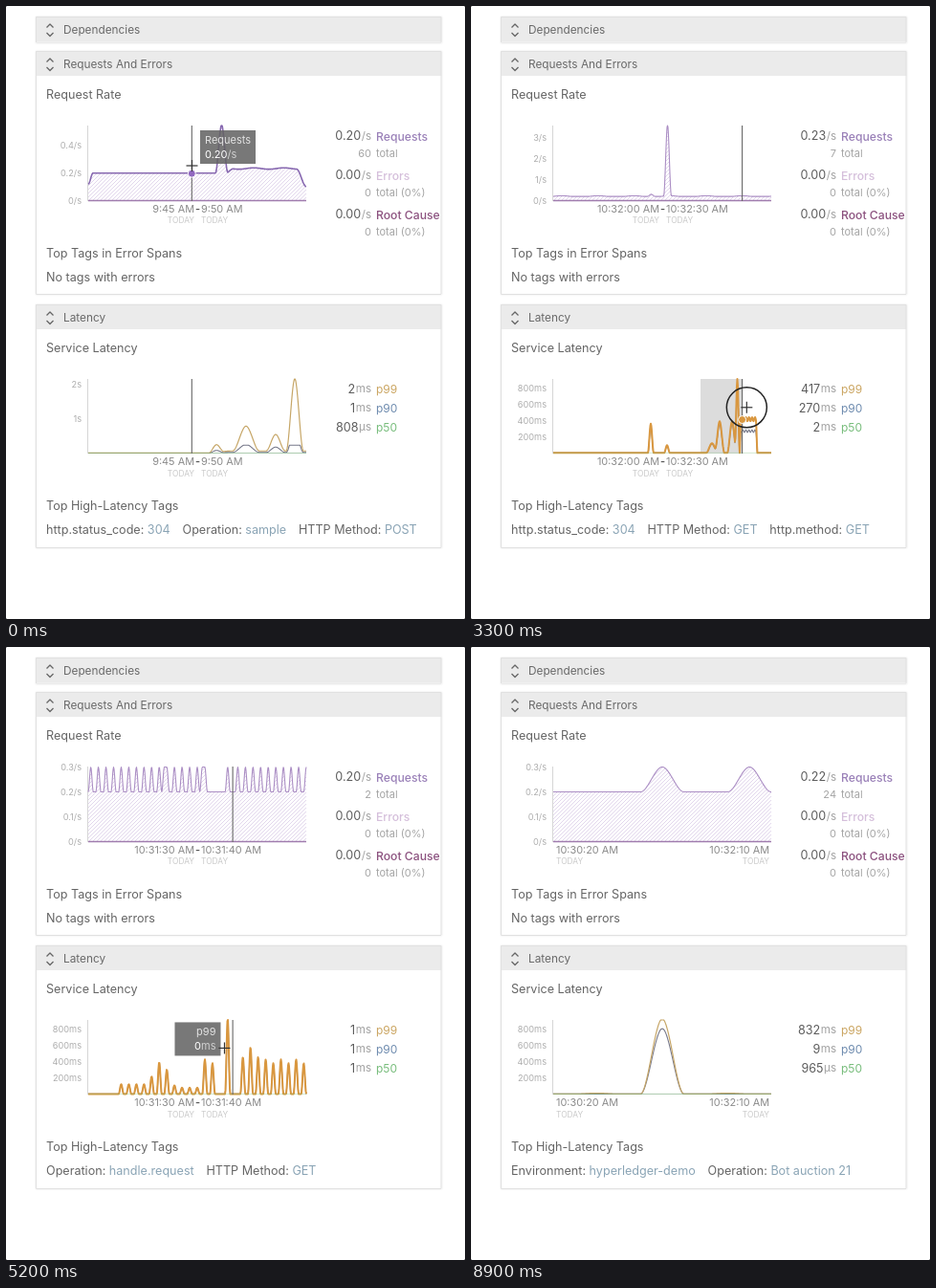
An HTML page with a canvas that plays this animation: 480x641 px, repeating every 9100 ms.

```html
<!DOCTYPE html>
<html lang="en">
<head>
<meta charset="utf-8">
<title>Service dashboard</title>
<style>
html, body { margin: 0; width: 100%; height: 100%; overflow: hidden; background: #fff; }
canvas { display: block; width: 480px; height: 641px; }
</style>
</head>
<body>
<canvas id="stage"></canvas>
<script>
const LOOP = 9100, LEFT = 86, RIGHT = 314;
const RATE = { top: 125, base: 204 }, LATENCY = { top: 390, base: 468 };
const COLORS = { p99: '#cba663', p90: '#6f8caf', p50: '#78bd7c', tag: '#8aa4b5' };
const canvas = document.getElementById('stage'), ctx = canvas.getContext('2d');
const dpr = window.devicePixelRatio || 1;
canvas.width = 480 * dpr;
canvas.height = 641 * dpr;

const ramp = (x, from, to) => {
  const u = Math.min(1, Math.max(0, (x - from) / (to - from)));
  return u * u * (3 - 2 * u);
};
const bump = (x, center, half, height) => height * ramp(Math.abs(x - center), half, 0);
const bumps = (x, ...list) => list.reduce((sum, [c, half, h]) => sum + bump(x, c, half, h), 0);
// Smooth curve through one value per time bin.
const binned = (bins, value) => x => {
  const position = (x - LEFT) / (RIGHT - LEFT) * bins, n = Math.floor(position + 1e-6);
  return value(n) + (value(n + 1) - value(n)) * ramp(position, n, n + 1);
};
const clock = (h, m, s) => h * 3600 + m * 60 + s;

// A burst of requests every third bin, with a pause around the slow request.
const isBurst = n => n < 47 ? n % 3 === 1 || (n > 15 && n % 15 === 0) : n === 55 || (n > 57 && n % 3 === 2);
function burstLatency(n) {
  const i = (n - 13) / 3;
  if (i < 0 || i % 1 || i === 13 || i === 15) return 0;
  if (i === 14) return 930;
  if (i < 11) return (i < 4 ? 120 : 78) + bump(i, 5.2, 2.2, 320);
  return (i % 2 ? 425 : 379) + bump(i, 17, 2, 150);
}
const slowBurst = binned(86, burstLatency);
const quiet = x => x > 270 ? .81 : 1;
const hourlyP99 = x => 2 + 60 * ramp(x, 214, 235)
  + bumps(x, [220, 8, 230], [251, 14, 720], [282, 10, 480], [302, 9, 2100]);
const plateauP99 = x => 2 + bumps(x, [188, 3, 360], [205, 3, 95], [252, 6, 120], [260, 5, 390], [273, 5, 390], [278.5, 2.5, 920])
  + (415 + 25 * Math.sin((x - 283.6) * 2)) * ramp(x, 281, 282) * ramp(x, 299.5, 298);

const scenes = [
  {
    bins: 40, bin: 300, shortTime: true, rateScale: 144, rateStep: .2, latencyScale: .036, latencyStep: 1000,
    time: x => clock(9, 45, 0) + (x - 194) * 53,
    rate: x => .2 - .08 * ramp(x, 91, 86) - .13 * ramp(x, 304, 314) + bump(x, 225.5, 6.5, .35)
      + (.033 + .005 * Math.sin(x / 5)) * ramp(x, 230, 238),
    p99: hourlyP99,
    p90: x => Math.max(1, Math.min(230, hourlyP99(x) * .32)),
    p50: () => .808,
    tags: [['http.status_code', '304'], ['Operation', 'sample'], ['HTTP Method', 'POST']]
  },
  {
    bins: 105, bin: 30, rateScale: 22, rateStep: 1, latencyScale: .085, latencyStep: 200,
    time: x => clock(10, 32, 0) + (x - 283) * 13.9,
    rate: x => .2 + bumps(x, [188.5, 4, .1], [205.5, 4, 3.4]) + .03 * Math.max(0, Math.cos((x - 283.6) / 6)),
    p99: plateauP99,
    p90: x => plateauP99(x) * (x > 281 ? .647 : .92),
    p50: () => 2,
    tags: [['http.status_code', '304'], ['HTTP Method', 'GET'], ['http.method', 'GET']]
  },
  {
    bins: 86, bin: 10, rateScale: 260, rateStep: .1, latencyScale: .085, latencyStep: 200,
    time: x => clock(10, 32, 0) + (x - 245) * 3.75,
    rate: binned(86, n => isBurst(n) ? .3 : .2),
    p99: x => quiet(x) + .003 + slowBurst(x),
    p90: x => quiet(x) + .002 + slowBurst(x) * .97,
    p50: quiet,
    tags: [['Operation', 'handle.request'], ['HTTP Method', 'GET']]
  },
  {
    bins: 10, bin: 10, rateScale: 260, rateStep: .1, latencyScale: .085, latencyStep: 200,
    time: x => clock(10, 30, 20) + (x - LEFT) / 2.28,
    rate: binned(10, n => n === 5 || n === 9 ? .3 : .2),
    p99: binned(10, n => n === 5 ? 925 : n % 6 === 2 ? 12 : 1),
    p90: binned(10, n => n === 5 ? 805 : 1),
    p50: () => 1,
    tags: [['Environment', 'hyperledger-demo'], ['Operation', 'Bot auction 21']]
  }
];

const loads = [[850, 1700], [3550, 4200], [6050, 6700]];
const drags = [[150, 850], [2580, 3550], [5450, 6050]];
// Each move: start, end, target x, target y.
const moves = [[150, 800, 255, 166], [1700, 2400, 240, 419], [2580, 3520, 303, 420], [4200, 4600, 286, 422],
  [4600, 5300, 219, 419], [5450, 5920, 246, 419], [8000, 8500, 320, 490], [8500, 8800, 435, 670]];

function pointer(t) {
  return moves.reduce(([x, y], [start, end, toX, toY]) => {
    const u = Math.min(1, Math.max(0, (t - start) / (end - start)));
    return [x + (toX - x) * u, y + (toY - y) * u];
  }, [194.5, 167]);
}
const during = (ranges, t) => ranges.find(([a, b]) => t >= a && t < b);

function snap(x, bins) {
  const step = (RIGHT - LEFT) / bins;
  return LEFT + Math.round((x - LEFT) / step) * step;
}

function text(s, x, cy, size, color, align = 'left', weight = 400) {
  ctx.font = `${weight} ${size}px Inter, sans-serif`;
  ctx.fillStyle = color;
  ctx.textAlign = align;
  ctx.fillText(s, x, cy + size * .36);
  return ctx.measureText(s).width;
}

function stroke(points, color, width = 1) {
  ctx.beginPath();
  points.forEach(([x, y]) => ctx.lineTo(x, y));
  ctx.strokeStyle = color;
  ctx.lineWidth = width;
  ctx.stroke();
}

function card(title, y, height) {
  ctx.save();
  ctx.shadowColor = 'rgba(0,0,0,.1)';
  ctx.shadowBlur = 2 * dpr;
  ctx.fillStyle = '#fff';
  ctx.fillRect(31, y, 424.5, height);
  ctx.restore();
  ctx.fillStyle = '#ebebeb';
  ctx.fillRect(31, y, 424.5, Math.min(height, 26));
  ctx.strokeStyle = '#e1e1e1';
  ctx.lineWidth = 1;
  ctx.strokeRect(31.5, y + .5, 423.5, height - 1);
  const cy = y + 14;
  stroke([[42.5, cy - 2.5], [46, cy - 6], [49.5, cy - 2.5]], '#666', 1.3);
  stroke([[42.5, cy + 3], [46, cy + 6.5], [49.5, cy + 3]], '#666', 1.3);
  text(title, 60, cy, 11.8, '#696969');
}

const heading = (s, cy) => text(s, 42, cy, 12.6, '#656565');

function loading(x, cy, t) {
  const turn = t / 1000 * Math.PI * 2;
  ctx.lineWidth = 3;
  ctx.strokeStyle = '#e0e0e3';
  ctx.beginPath();
  ctx.arc(x, cy, 6, turn - 2.6, turn + 2.1);
  ctx.stroke();
  text('Loading...', x + 12, cy, 12.1, '#adadad');
}

function drawLoading(t) {
  card('Requests And Errors', 47, 149);
  card('Latency', 205, 149);
  [['Request Rate', 'Top Tags in Error Spans'], ['Service Latency', 'Top High-Latency Tags']].forEach(([a, b], i) => {
    const y = 92.5 + i * 158;
    heading(a, y);
    loading(213.5, y + 25, t);
    heading(b, y + 59);
    loading(49.5, y + 84, t);
  });
}

function trace(f, area, scale) {
  const points = [];
  for (let x = LEFT; x <= RIGHT; x += .5) points.push([x, Math.max(area.top, area.base - .5 - f(x) * scale)]);
  return points;
}

function axis(area, first, step, scale, label) {
  stroke([[85.5, area.top], [85.5, area.base]], '#d6d6d6');
  for (let n = first; n * step * scale < area.base - area.top; n++) {
    text(label(n * step), 79, area.base - n * step * scale - .5, 9.2, '#adadad', 'right');
  }
}

function hatch(points, base) {
  ctx.save();
  ctx.beginPath();
  points.forEach(([x, y]) => ctx.lineTo(x, y));
  ctx.lineTo(RIGHT, base);
  ctx.lineTo(LEFT, base);
  ctx.clip();
  for (let x = LEFT - 80; x < RIGHT; x += 4) stroke([[x, base], [x + 80, base - 80]], '#dfd3ea', .9);
  ctx.restore();
}

function timeText(seconds, short) {
  const pad = n => String(n).padStart(2, '0');
  const minutes = `${Math.floor(seconds / 3600)}:${pad(Math.floor(seconds / 60) % 60)}`;
  return minutes + (short ? '' : ':' + pad(seconds % 60)) + ' AM';
}

function timeLabels(scene, hover, y) {
  const open = hover === null;
  const from = open ? clock(10, 30, 20) : Math.round(scene.time(hover) / scene.bin) * scene.bin;
  const to = open ? clock(10, 32, 10) : from + scene.bin;
  const sides = open ? [[89, 'left', from], [312, 'right', to]] : [[197, 'right', from], [204, 'left', to]];
  sides.forEach(([x, align, time]) => {
    text(timeText(time, scene.shortTime), x, y, 10.9, '#8b8b8b', align);
    text('TODAY', x, y + 12, 8.4, '#cacaca', align);
  });
  if (!open) text('-', 200.5, y, 11, '#555', 'center', 600);
}

function quantity(number, unit, cy) {
  const width = text(unit, 382, cy, 11.6, '#a2a2a2', 'right');
  text(number, 381.5 - width, cy, 12.6, '#5d5d5d', 'right');
}

const duration = ms => ms < 1 ? [Math.round(ms * 1000), 'µs'] : [Math.round(ms), 'ms'];

function legend(scene, hover) {
  const total = hover === null ? 24 : Math.round(scene.rate(hover) * scene.bin);
  const rate = hover === null ? .22 : total / scene.bin;
  [['Requests', '#9a80b8', rate, total, 'total'], ['Errors', '#d5bfdb', 0, 0, 'total (0%)'],
    ['Root Cause', '#8c527f', 0, 0, 'total (0%)']].forEach(([name, color, perSecond, count, note], i) => {
    const y = 136 + i * 41;
    quantity(perSecond.toFixed(2), '/s', y - .5);
    text(name, 387, y + .5, 12.2, color, 'left', 500);
    text(count, 382, y + 18, 11, '#a5a5a5', 'right');
    text(note, 387, y + 18, 11, '#a5a5a5');
  });
  const idle = { p99: 832, p90: 9, p50: .965 };
  ['p99', 'p90', 'p50'].forEach((key, i) => {
    const y = 400 + i * 20;
    quantity(...duration(hover === null ? idle[key] : scene[key](hover)), y);
    text(key, 387, y + 1, 12, COLORS[key]);
  });
}

function dot(x, y, color) {
  ctx.beginPath();
  ctx.arc(x, y, 4, 0, 7);
  ctx.fillStyle = color;
  ctx.fill();
  ctx.strokeStyle = '#fff';
  ctx.lineWidth = 1;
  ctx.stroke();
}

function tooltip(x, y, width, align, name, number, unit) {
  ctx.fillStyle = 'rgba(98,98,98,.86)';
  ctx.fillRect(x, y, width, 35);
  const edge = align === 'left' ? x + 5 : x + width - 5;
  text(name, edge, y + 10, 11, '#e2e2e2', align);
  const unitWidth = ctx.measureText(unit).width, numberWidth = ctx.measureText(number).width;
  const start = align === 'left' ? edge : edge - unitWidth - numberWidth;
  text(number, start, y + 25, 11, '#fff');
  text(unit, start + numberWidth, y + 25, 11, '#d0d0d0');
}

function drawCharts(t, index, hover, drag, onLatency) {
  const scene = scenes[index];
  card('Requests And Errors', 47, 255);
  card('Latency', 312, 255);
  heading('Request Rate', 92.5);
  heading('Top Tags in Error Spans', 258);
  heading('No tags with errors', 283);
  heading('Service Latency', 357);
  heading('Top High-Latency Tags', 522.5);

  if (drag) {
    const area = index ? LATENCY : RATE, start = pointer(drag[0])[0];
    ctx.fillStyle = '#dcdcdc';
    ctx.fillRect(start, area.top, hover - start, area.base - area.top);
  }

  axis(RATE, 0, scene.rateStep, scene.rateScale, v => +v.toFixed(1) + '/s');
  const rateLine = trace(scene.rate, RATE, scene.rateScale);
  hatch(rateLine, RATE.base);
  stroke([[LEFT, 203.5], [RIGHT, 203.5]], '#a07cae', 1.3);
  stroke(rateLine, index ? '#ab8ec4' : '#8768b0', index ? 1.1 : 1.6);

  axis(LATENCY, 1, scene.latencyStep, scene.latencyScale, v => index ? v + 'ms' : v / 1000 + 's');
  const bold = onLatency && index < 3;
  const line = key => trace(scene[key], LATENCY, scene.latencyScale);
  stroke(line('p90'), '#77798a', 1.1);
  stroke(line('p99'), bold ? '#d9973f' : '#c6a667', bold ? 2 : 1.2);
  stroke(line('p50'), bold ? 'rgba(120,189,124,.35)' : 'rgba(120,170,124,.75)');

  timeLabels(scene, hover, 212);
  timeLabels(scene, hover, 476.5);
  legend(scene, hover);
  let x = 42;
  scene.tags.forEach(([name, value]) => {
    x += text(name + ': ', x, 547, 12.6, '#656565');
    x += text(value, x, 547, 12.6, COLORS.tag) + 12.8;
  });

  if (hover === null) return;
  [RATE, LATENCY].forEach(a => stroke([[hover, a.top], [hover, a.base]], '#666', 1.1));
  if (index === 0) {
    dot(hover, RATE.base - scene.rate(hover) * scene.rateScale, '#9168c0');
    if (!drag) tooltip(203, 130, 58, 'left', 'Requests', '0.20', '/s');
  } else if (bold && (drag || index === 1)) {
    dot(hover, LATENCY.base - scene.p99(hover) * scene.latencyScale, '#d9973f');
  } else if (bold) {
    const step = (RIGHT - LEFT) / scene.bins;
    const nearby = Math.max(...[-1, 0, 1].map(n => scene.p99(hover + n * step) - quiet(hover)));
    const [px, py] = pointer(t);
    tooltip(px - 52, py - 27, 48, 'right', 'p99', Math.round(nearby), 'ms');
  }
}

function drawCursor(x, y, cross, ring) {
  if (ring) {
    ctx.beginPath();
    ctx.arc(x, y, 21, 0, 7);
    ctx.strokeStyle = '#222';
    ctx.lineWidth = 1.5;
    ctx.stroke();
  }
  if (cross) {
    stroke([[x - 6, y], [x + 6, y]], '#333', 1.2);
    stroke([[x, y - 6], [x, y + 6]], '#333', 1.2);
    return;
  }
  ctx.beginPath();
  [[0, 0], [0, 11.5], [2.6, 9.2], [4.4, 13.2], [6.3, 12.3], [4.6, 8.4], [8, 8.2]]
    .forEach(([dx, dy]) => ctx.lineTo(x + dx, y + dy));
  ctx.closePath();
  ctx.strokeStyle = '#fff';
  ctx.lineWidth = 2;
  ctx.stroke();
  ctx.fillStyle = '#111';
  ctx.fill();
}

function draw(t) {
  ctx.setTransform(dpr, 0, 0, dpr, 0, 0);
  ctx.lineJoin = 'round';
  ctx.fillStyle = '#fff';
  ctx.fillRect(0, 0, 480, 641);
  ctx.fillStyle = '#aaa';
  [0, 479].forEach(x => [0, 640].forEach(y => ctx.fillRect(x, y, 1, 1)));
  card('Dependencies', 11, 27.5);

  const busy = during(loads, t), drag = during(drags, t);
  const index = loads.filter(([, end]) => t >= end).length;
  const [x, y] = pointer(t);
  const inside = area => y >= area.top && y <= area.base;
  if (busy) {
    drawLoading(t);
  } else {
    // The reloaded last chart keeps its marker at the end until the pointer moves.
    const stale = index === 3 && t < 8000;
    const hover = stale ? RIGHT : y > LATENCY.base ? null : snap(pointer(t - 80)[0], scenes[index].bins);
    drawCharts(t, index, hover, drag, inside(LATENCY));
  }
  const released = t >= 5950 && t < 6700;
  drawCursor(x, y, !busy && !released && (inside(RATE) || inside(LATENCY)), drag && !released);
}

function frame(now) {
  draw(now % LOOP);
  requestAnimationFrame(frame);
}
requestAnimationFrame(frame);
</script>
</body>
</html>
```
